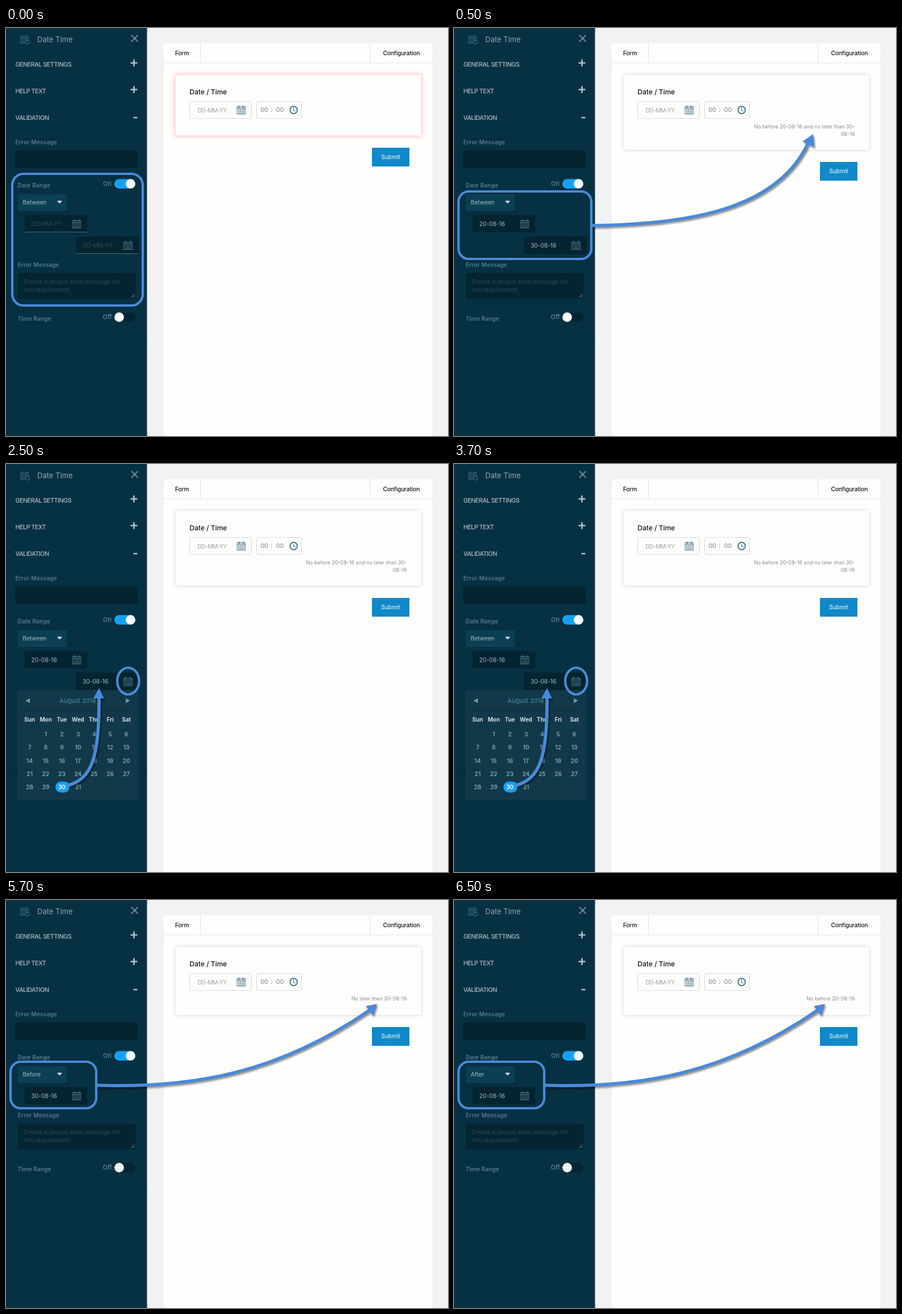
These frames come from a looping animation (779x719 px, 8 s). An HTML page:

```html
<!DOCTYPE html>
<html lang="en">
<head>
<meta charset="utf-8">
<title>Date range validation</title>
<style>
  html, body { margin: 0; width: 100%; height: 100%; overflow: hidden; background: #f1f3f2; }
  svg { display: block; }
  text { font-family: Inter, "Open Sans", sans-serif; font-size: 10.2px; }

  .title { font-size: 13px; fill: #93a8b1; }
  .section { font-size: 10.8px; font-weight: 500; letter-spacing: -.5px; fill: #adbbc1; }
  .label { font-weight: 600; letter-spacing: .12px; fill: #567a8a; }
  .state { font-size: 11px; fill: #7c959f; }
  .value { fill: #a9bac1; }
  .hint { font-size: 10.5px; fill: #294b59; }
  .blank { font-size: 10.3px; letter-spacing: -.45px; fill: #294b59; }
  .tab { font-weight: 500; letter-spacing: -.15px; fill: #111; }
  .time { font-size: 10.9px; fill: #808080; }
  .note { font-size: 9.05px; fill: #8b8b8b; text-anchor: end; }
  .day { font-weight: 600; fill: #8ba2ad; text-anchor: middle; }
  .head { font-size: 10px; fill: #e9eef0; }
  .well { fill: #042530; stroke: #031f29; }
  .mark { fill: none; stroke: #4a8ad8; stroke-width: 4.2; }
  .arrow { filter: drop-shadow(2px 3px 1.5px rgba(0, 0, 0, .42)); }
  .arrow path { fill: none; stroke: #4a8ad8; stroke-width: 5.6; }
  .arrow polygon { fill: #4a8ad8; }
  .card { fill: #fefefd; filter: drop-shadow(0 0 3.5px #cfd6d6); }
  .alert { filter: drop-shadow(0 0 1px #ffc9c9) drop-shadow(0 0 4px #ffb9b9); }

  /* Visibility per phase: blank, between, picker, before, after */
  .blankPhase, .between, .picker, .before, .after, .range, .filled, .single { opacity: 0; }
  .blankPhase, .between, .picker, .before, .after, .range, .filled, .single, .lower, .submit {
    animation: 8s step-end infinite;
  }
  .blankPhase { animation-name: blankPhase; }
  .between { animation-name: between; }
  .picker { animation-name: picker; }
  .before { animation-name: before; }
  .after { animation-name: after; }
  .range { animation-name: range; }
  .filled { animation-name: filled; }
  .single { animation-name: single; }
  .lower { animation-name: lower; }
  .submit { animation-name: submit; }
  @keyframes blankPhase { 0% { opacity: 1 } 6.25%, 100% { opacity: 0 } }
  @keyframes between { 0% { opacity: 0 } 6.25% { opacity: 1 } 31.25%, 100% { opacity: 0 } }
  @keyframes picker { 0% { opacity: 0 } 31.25% { opacity: 1 } 56.25%, 100% { opacity: 0 } }
  @keyframes before { 0% { opacity: 0 } 56.25% { opacity: 1 } 81.25%, 100% { opacity: 0 } }
  @keyframes after { 0% { opacity: 0 } 81.25%, 100% { opacity: 1 } }
  @keyframes range { 0% { opacity: 1 } 56.25%, 100% { opacity: 0 } }
  @keyframes filled { 0% { opacity: 0 } 6.25% { opacity: 1 } 56.25%, 100% { opacity: 0 } }
  @keyframes single { 0% { opacity: 0 } 56.25%, 100% { opacity: 1 } }
  @keyframes lower {
    0% { transform: translateY(0) }
    56.25%, 100% { transform: translateY(-38px) }
  }
  @keyframes submit {
    0% { transform: translateY(0) }
    6.25% { transform: translateY(25px) }
    56.25%, 100% { transform: translateY(12.5px) }
  }
</style>
</head>
<body>
<svg width="779" height="719" viewBox="0 0 779 719">
  <defs>
    <symbol id="cal" viewBox="0 0 16 16">
      <g fill="none" stroke="currentColor">
        <path d="M.7 2.7H15.3V15.3H.7Z" stroke-width="1.2"/>
        <path d="M.7 5.6H15.3" stroke-width="1.2"/>
        <path d="M4.2 .2V4M11.8 .2V4" stroke-width="1.8"/>
        <path d="M3 8H13.4M3 10.6H13.4M3 13.2H13.4" stroke-width="1.7" stroke-dasharray="1.8 1.05"/>
      </g>
    </symbol>
  </defs>

  <!-- Form preview -->
  <rect width="779" height="719" fill="#f1f3f2"/>
  <rect x="278" y="27" width="473.5" height="692" fill="#fefefd"/>
  <path d="M278 61.5H751.5M342.5 27V61M641.5 27V61" stroke="#e0e3e3" fill="none"/>
  <text class="tab" x="298" y="48">Form</text>
  <text class="tab" x="664.5" y="47.5">Configuration</text>

  <rect class="blankPhase card alert" x="298.5" y="82.5" width="433" height="107"/>
  <rect class="filled card" x="298.5" y="82.5" width="433" height="132"/>
  <rect class="single card" x="298.5" y="82.5" width="433" height="120"/>

  <text x="323.5" y="116.5" style="font-size:12px;font-weight:500" fill="#111">Date / Time</text>
  <g fill="#fefefd" stroke="#d0dadf">
    <rect x="323.5" y="129.5" width="109" height="30" rx="2"/>
    <rect x="441.5" y="129.5" width="79" height="30" rx="2"/>
  </g>
  <text class="blank" x="337.5" y="148.5" style="fill:#a3a3a3;letter-spacing:-.6px">DD-MM-YY</text>
  <use href="#cal" x="406.5" y="136.5" width="16" height="16" color="#4b758a"/>
  <text class="time" x="448.5" y="148">00</text>
  <text class="time" x="466.5" y="147.5">:</text>
  <text class="time" x="476" y="148">00</text>
  <g fill="none" stroke="#4b758a">
    <circle cx="507" cy="144.5" r="6.4" stroke-width="2"/>
    <path d="M506.8 140.5V145L510 146.6" stroke-width="1.3"/>
  </g>

  <g class="filled">
    <text class="note" x="706.5" y="177.3">No before 20-08-16 and no later than 30-</text>
    <text class="note" x="706.5" y="189.5">08-16</text>
  </g>
  <text class="note before" x="706.5" y="177.3">No later then 30-08-16</text>
  <text class="note after" x="706.5" y="177.3">No before 20-08-16</text>

  <g class="submit">
    <rect x="645" y="211" width="66" height="33" fill="#1188c8"/>
    <text x="678" y="231" text-anchor="middle" fill="#fff">Submit</text>
  </g>

  <!-- Settings panel -->
  <rect width="248.5" height="719" fill="#063143"/>
  <g color="#3f6576">
    <use href="#cal" x="25" y="12.5" width="15" height="15"/>
    <circle cx="38" cy="25" r="3.4" fill="#063143" stroke="currentColor" stroke-width="1.2"/>
  </g>
  <text class="title" x="55" y="24.7">Date Time</text>
  <path d="M221 12.5L232.5 24M232.5 12.5L221 24" stroke="#718a96" stroke-width="2"/>
  <text class="section" x="16.5" y="68">GENERAL SETTINGS</text>
  <text class="section" x="16.5" y="115.2">HELP TEXT</text>
  <text class="section" x="16.5" y="162.4">VALIDATION</text>
  <path d="M219.5 61.5H231.5M225.5 55.5V67.5M219.5 108.5H231.5M225.5 102.5V114.5M224.5 158H231.5"
        stroke="#b3c1c7" stroke-width="2.6"/>

  <text class="label" x="16.5" y="205">Error Message</text>
  <rect class="well" x="16.5" y="216.5" width="215" height="29" rx="2"/>

  <text class="label" x="20.5" y="281">Date Range</text>
  <text class="state" x="171" y="278.3">On</text>
  <rect x="191" y="266.3" width="37" height="16.6" rx="8.3" fill="#14a0fa"/>
  <circle cx="219.5" cy="274.6" r="8.4" fill="#fdfefe"/>

  <rect x="21" y="293" width="86" height="28.5" fill="#0b4054"/>
  <path d="M21 321H107" stroke="#124a5f"/>
  <path d="M90 304.5H99L94.5 309.3Z" fill="#dde6e9"/>
  <text class="value range" x="29.5" y="310.7">Between</text>
  <text class="value before" x="29.5" y="310.7">Before</text>
  <text class="value after" x="29.5" y="310.7">After</text>

  <rect class="well" x="33.5" y="330.5" width="109" height="29" rx="2"/>
  <use href="#cal" x="116.5" y="337" width="16" height="16" color="#4a7082"/>
  <text class="blank blankPhase" x="44.5" y="348.7">DD-MM-YY</text>
  <text class="value filled" x="44.5" y="348.7">20-08-16</text>
  <text class="value before" x="44.5" y="348.7">30-08-16</text>
  <text class="value after" x="44.5" y="348.7">20-08-16</text>

  <g class="range">
    <rect class="well" x="124.5" y="368.5" width="109" height="29" rx="2"/>
    <use href="#cal" x="207" y="375" width="16" height="16" color="#4a7082"/>
  </g>
  <text class="blank blankPhase" x="135" y="386.8">DD-MM-YY</text>
  <text class="value filled" x="135" y="386.8">30-08-16</text>
  <path class="blankPhase" d="M34 359.5H143M124 397.5H233" stroke="#4d6a76"/>

  <g class="lower">
    <text class="label" x="20.5" y="420.7">Error Message</text>
    <rect class="well" x="21.5" y="432.5" width="206" height="44" rx="2"/>
    <text class="hint" x="31" y="450.5">Create a unique error message for</text>
    <text class="hint" x="31" y="465.3">this requirement.</text>
    <path d="M220.5 475L226.5 469M224 475L226.5 472.5" stroke="#93a3aa"/>
    <text class="label" x="20.5" y="516">Time Range</text>
    <text class="state" x="170.5" y="513.3">Off</text>
    <rect x="191" y="501.3" width="37" height="16.6" rx="8.3" fill="#042530"/>
    <circle cx="199.5" cy="509.6" r="8.4" fill="#fdfefe"/>
    <path d="M0 548.5H248.5" stroke="#042635"/>
  </g>

  <!-- Date picker -->
  <g class="picker">
    <rect x="20" y="398.5" width="213" height="193.5" fill="#12394a"/>
    <path d="M42 412.7V421.3L34.5 417ZM211 412.7V421.3L218.5 417Z" fill="#7d98a4"/>
    <text x="126.7" y="421" text-anchor="middle" style="font-size:11px" fill="#5488a0">August 2016</text>
    <path d="M27 434.5H226" stroke="#0a2836"/>
    <rect x="87" y="559.5" width="25" height="19.5" rx="9.7" fill="#14a0fa"/>
    <g id="days"></g>
  </g>

  <!-- Call-outs -->
  <rect class="mark blankPhase" x="11" y="257" width="230" height="232" rx="20"/>
  <g class="between">
    <g class="arrow">
      <path d="M243 348C420 346 570 318 624 203"/>
      <polygon points="633,187 614,200 635,210"/>
    </g>
    <rect class="mark" x="8" y="288" width="234" height="119" rx="18"/>
  </g>
  <g class="picker">
    <g class="arrow">
      <path d="M109 566.5C150 555 165 520 164 410"/>
      <polygon points="164,395 154,413 173,413"/>
    </g>
    <ellipse class="mark" cx="215.3" cy="382.5" rx="19.3" ry="23.5"/>
  </g>
  <g class="single">
    <g class="arrow">
      <path d="M160 326.5C330 332 480 305 641 194"/>
      <polygon points="654,183 634,187 647,204"/>
    </g>
    <rect class="mark" x="8" y="285" width="151" height="82" rx="18"/>
  </g>
</svg>
<script>
  const days = document.getElementById("days");

  function addDay(label, col, y, extra = "") {
    const t = document.createElementNS("http://www.w3.org/2000/svg", "text");
    t.setAttribute("class", "day " + extra);
    t.setAttribute("x", 41.7 + col * 28.4);
    t.setAttribute("y", y);
    t.textContent = label;
    days.append(t);
    return t;
  }

  "Sun Mon Tue Wed Thu Fri Sat".split(" ").forEach((name, i) => addDay(name, i, 454.2, "head"));
  for (let d = 1; d <= 31; d++) {
    const t = addDay(d, d % 7, 480.2 + Math.floor(d / 7) * 23.2);
    if (d === 30) t.style.fill = "#fff";
  }
</script>
</body>
</html>
```
